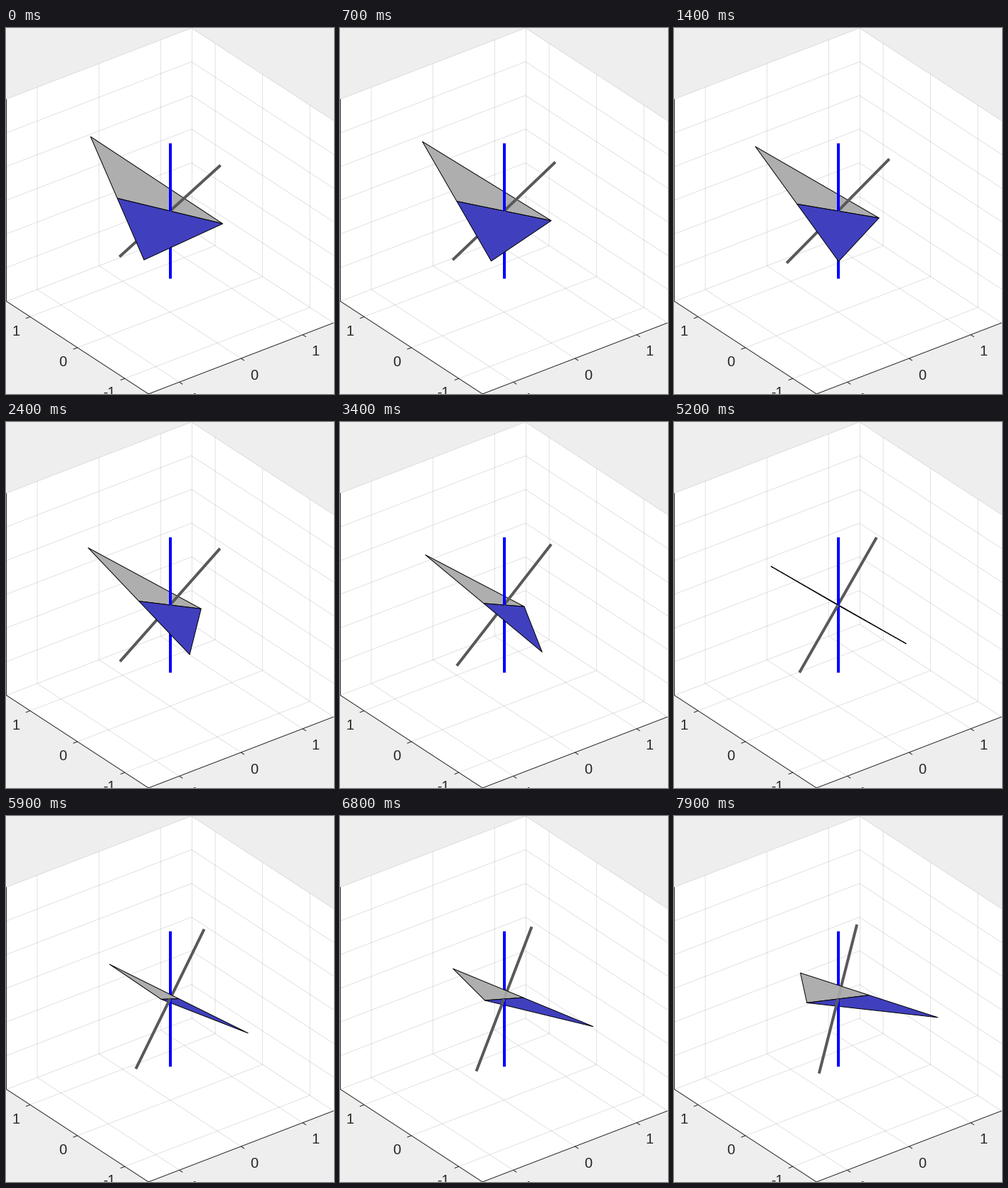
A matplotlib script that plays this animation: 461 px wide and 514 px high, repeating every 8000 ms.

```python
import numpy as np
import matplotlib.pyplot as plt
from matplotlib.animation import FuncAnimation
from matplotlib.patches import Polygon

W, H, DPI = 461, 514, 100
FRAMES, INTERVAL = 80, 100
PX = 72 / DPI                        # one pixel in points
SCALE, ORIGIN = 109.3, np.array([230.5, 257.0])
LIM = 1.5
INK = "#262626"

# Orthographic camera
AZ, EL = np.radians([-37.5, 30])
RIGHT = np.array([np.cos(AZ), np.sin(AZ), 0])
UP = np.array([-np.sin(AZ) * np.sin(EL), np.cos(AZ) * np.sin(EL), np.cos(EL)])
TOWARD = np.cross(RIGHT, UP)


def project(points):
    p = np.atleast_2d(np.asarray(points, float))
    return ORIGIN + SCALE * np.column_stack([p @ RIGHT, -(p @ UP)])


def rot_x(a):
    c, s = np.cos(a), np.sin(a)
    return np.array([[1, 0, 0], [0, c, -s], [0, s, c]])


def rot_y(a):
    c, s = np.cos(a), np.sin(a)
    return np.array([[c, 0, s], [0, 1, 0], [-s, 0, c]])


def rot_z(a):
    c, s = np.cos(a), np.sin(a)
    return np.array([[c, -s, 0], [s, c, 0], [0, 0, 1]])


fig = plt.figure(figsize=(W / DPI, H / DPI), dpi=DPI, facecolor="#eeeeee")
ax = fig.add_axes([0, 0, 1, 1])
ax.set_xlim(0, W)
ax.set_ylim(H, 0)
ax.axis("off")


def line(points, color, width, z, **kw):
    xy = project(points) if len(points) else np.empty((0, 2))
    return ax.plot(xy[:, 0], xy[:, 1], color=color, lw=width * PX, zorder=z,
                   solid_capstyle="butt", **kw)[0]


def label(x, y, text):
    ax.text(x, y + 7, text, fontsize=20 * PX, family="Liberation Sans",
            color=INK, ha="center", va="baseline", zorder=3)


def draw_box():
    L = LIM
    walls = [
        [(-L, -L, -L), (L, -L, -L), (L, L, -L), (-L, L, -L)],
        [(-L, L, -L), (L, L, -L), (L, L, L), (-L, L, L)],
        [(L, -L, -L), (L, L, -L), (L, L, L), (L, -L, L)],
    ]
    for wall in walls:
        ax.add_patch(Polygon(project(wall), fc="white", ec="white",
                             lw=0.5 * PX, zorder=0))
    grid = dict(color=INK, width=1, z=1, alpha=0.13)
    for t in (-1, 0, 1):
        line([(t, -L, -L), (t, L, -L), (t, L, L)], **grid)
        line([(-L, t, -L), (L, t, -L), (L, t, L)], **grid)
    for t in np.arange(-1.5, 1.6, 0.5):
        line([(-L, L, t), (L, L, t), (L, -L, t)], **grid)
    line([(L, L, -L), (L, L, L)], **grid)

    line([(-L, L, L), (-L, L, -L), (-L, -L, -L), (L, -L, -L)], INK, 1, 2)
    for t in (-1, 0, 1):
        line([(-L, t, -L), (-L - 0.07, t, -L)], INK, 1, 2)
        line([(t, -L, -L), (t, -L - 0.07, -L)], INK, 1, 2)
        label(79.5 - 65.5 * t, 468 - 43.5 * t, str(t))
        label(348.5 + 87 * t, 486.5 - 33.5 * t, str(t))


draw_box()

BLUE, GRAY = "#0000ff", "#595959"
face_style = dict(ec="black", lw=PX, joinstyle="round", zorder=6)
gray_face = ax.add_patch(Polygon(np.zeros((3, 2)), fc="#aeaeae", **face_style))
blue_face = ax.add_patch(Polygon(np.zeros((3, 2)), fc="#4040be", **face_style))
z_up, z_down = line([], BLUE, 4, 4), line([], BLUE, 4, 4)
n_up, n_down = line([], GRAY, 4, 4), line([], GRAY, 4, 4)
ghost = line([], GRAY, 4, 7, alpha=0.12)

TILT = rot_y(np.radians(30)) @ rot_x(np.radians(30))
Z_AXIS = np.array([0, 0, 1])


def place(artist, end):
    artist.set_data(*project([(0, 0, 0), end]).T)


def update(i):
    # The tilted triangle turns about the vertical, one degree per frame
    tip, side, normal = (rot_z(np.radians(i + 1)) @ TILT).T
    gray_face.set_xy(project([side - tip, -tip, tip]))
    blue_face.set_xy(project([-side - tip, -tip, tip]))

    place(z_up, Z_AXIS)
    place(z_down, -Z_AXIS)
    place(n_up, normal)
    place(n_down, -normal)

    top_seen = normal @ TOWARD > 0
    front, back = 8, 4
    upper, lower = (front, back) if top_seen else (back, front)
    n_up.set_zorder(upper)
    z_up.set_zorder(upper + 0.5)
    z_down.set_zorder(lower)
    n_down.set_zorder(lower + 0.5)

    # Trace of the hidden normal through the gray face
    place(ghost, normal)
    ghost.set_clip_path(gray_face)
    ghost.set_visible(not top_seen)
    return gray_face, blue_face, z_up, z_down, n_up, n_down, ghost


anim = FuncAnimation(fig, update, frames=FRAMES, interval=INTERVAL,
                     repeat=True, repeat_delay=0, blit=False)
plt.show()
```
